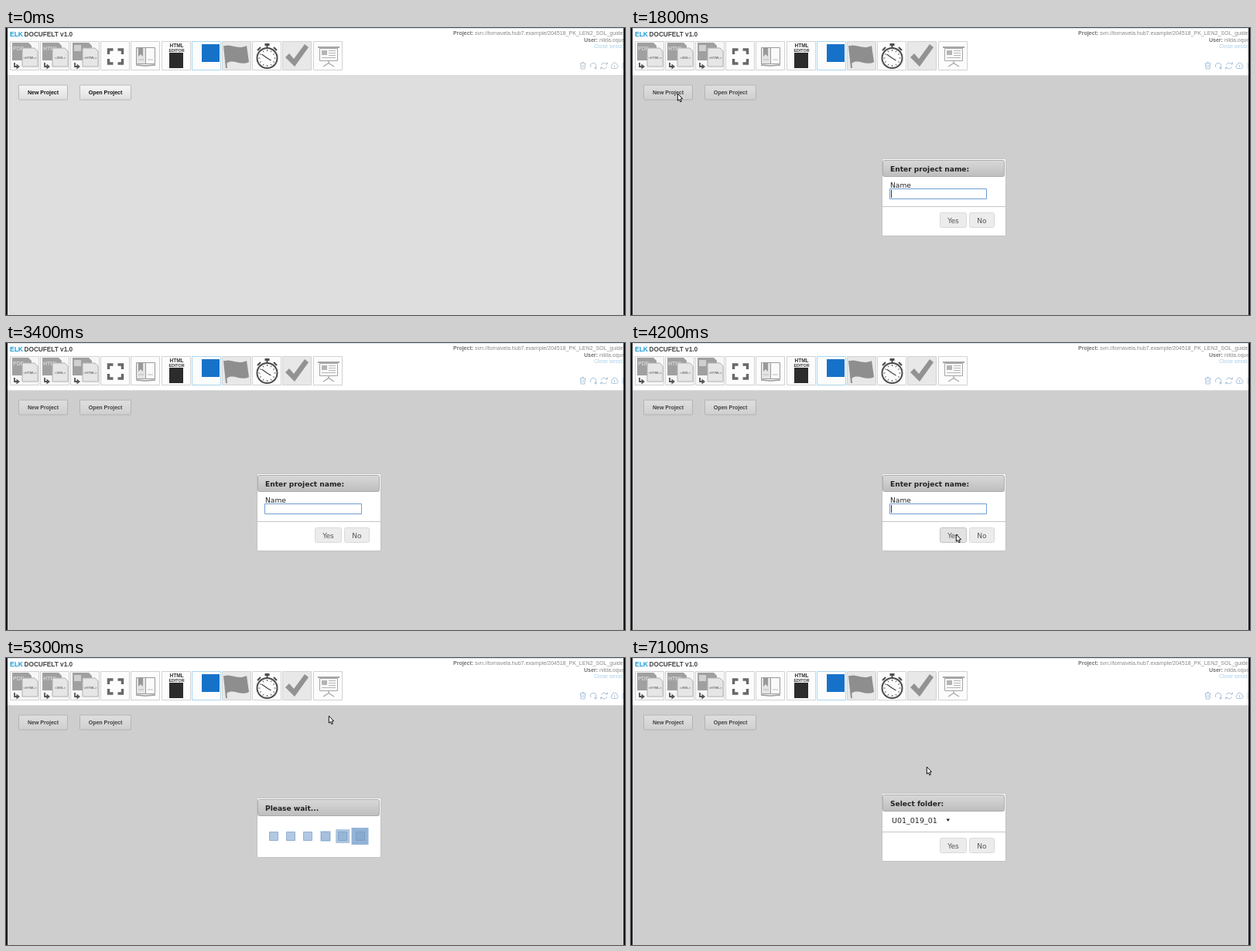
An HTML page with a canvas that plays this animation: 800x372 px, repeating every 7.2 s.

```html
<!DOCTYPE html>
<html lang="en">
<head>
<meta charset="utf-8">
<title>Project setup</title>
<style>
html, body { margin: 0; width: 100%; height: 100%; overflow: hidden; background: #dedede; }
canvas { display: block; width: 100%; height: 100%; }
</style>
</head>
<body>
<canvas id="stage" width="800" height="372"></canvas>
<script>
const g = document.getElementById('stage').getContext('2d');
const LOOP = 7200, STEP = 100;
const ARIAL = '"Liberation Sans", Arial, sans-serif';
const DEJAVU = '"DejaVu Sans", Verdana, sans-serif';

// Pointer paths: [time, x, y]
const PATHS = [
  [[200, 390, 110], [400, 330, 268], [900, 63, 91], [1000, 61, 90], [1100, 61, 79],
   [1200, 61, 79], [1400, 60, 85], [1900, 60, 85], [2400, 380, 205], [2700, 375, 205], [3200, 400, -14]],
  [[3600, 400, 24], [4200, 420, 248], [4900, 420, 248], [5100, 419, 190],
   [5200, 418, 124], [5300, 417, 75], [5500, 416, -14]],
  [[7000, 388, 53], [7100, 382, 141]]
];

function rect(x, y, w, h, fill) {
  g.fillStyle = fill;
  g.fillRect(x, y, w, h);
}

function box(x, y, w, h, fill, edge, r = 0) {
  g.beginPath();
  g.roundRect(x + 0.5, y + 0.5, w - 1, h - 1, r);
  g.fillStyle = fill;
  g.fill();
  g.lineWidth = 1;
  g.strokeStyle = edge;
  g.stroke();
}

function text(s, x, y, font, color, align = 'left') {
  g.font = font;
  g.fillStyle = color;
  g.textAlign = align;
  g.fillText(s, x, y);
}

function shape(points, fill) {
  g.beginPath();
  points.forEach(([x, y]) => g.lineTo(x, y));
  g.closePath();
  g.fillStyle = fill;
  g.fill();
}

function line(points, color, width) {
  g.beginPath();
  points.forEach(([x, y]) => g.lineTo(x, y));
  g.strokeStyle = color;
  g.lineWidth = width;
  g.stroke();
}

function arc(x, y, r, from, to, color, width) {
  g.beginPath();
  g.arc(x, y, r, from, to);
  g.strokeStyle = color;
  g.lineWidth = width;
  g.stroke();
}

function shade(y, h, top, bottom) {
  const s = g.createLinearGradient(0, y, 0, y + h);
  s.addColorStop(0, top);
  s.addColorStop(1, bottom);
  return s;
}

function at(x, draw) {
  g.save();
  g.translate(x, 17);
  draw();
  g.restore();
}

// Toolbar icons, drawn relative to their cell
function convertIcon(label, tag) {
  shape([[3, 2], [24, 2], [28, 6], [28, 25], [3, 25]], '#a0a0a0');
  if (label) text(label, 4, 12, 'bold 7px ' + ARIAL, '#d4d4d4');
  else rect(5, 5, 9, 8, '#d0d0d0');
  const page = [[16, 9], [32, 9], [36, 13], [36, 33], [16, 33]];
  shape(page, '#e6e6e6');
  line([...page, page[0]], '#b0b0b0', 1);
  text(tag, 26, 22.5, 'bold 4.3px ' + ARIAL, '#777', 'center');
  line([[6, 28], [6, 33], [9, 33]], '#555', 1.8);
  shape([[8.5, 29.5], [13, 33], [8.5, 36.5]], '#555');
}

function frameIcon() {
  for (const sx of [-1, 1]) for (const sy of [-1, 1]) {
    const p = (x, y) => [19.5 + sx * x, 20 + sy * y];
    line([p(9, 3), p(9, 9), p(3, 9)], '#686868', 3.4);
  }
}

function bookIcon() {
  box(7, 8, 13, 22, '#e4e4e4', '#999');
  box(19, 8, 13, 22, '#fafafa', '#999');
  shape([[10, 9], [16, 9], [16, 20], [13, 17], [10, 20]], '#999');
  line([[22, 24], [29, 24]], '#bbb', 1);
  line([[10, 24], [17, 24]], '#bbb', 1);
  line([[7, 31], [19, 32], [32, 31]], '#999', 1.3);
}

function editorIcon() {
  text('HTML', 19.5, 8, 'bold 6.5px ' + ARIAL, '#333', 'center');
  text('EDITOR', 19.5, 13.5, 'bold 5.3px ' + ARIAL, '#333', 'center');
  rect(10, 15, 18, 20, '#2c2c2c');
}

function flagIcon() {
  line([[3, 6], [6, 35]], '#8e8e8e', 2);
  g.beginPath();
  g.moveTo(3, 7);
  g.bezierCurveTo(11, 2, 19, 12, 32, 6);
  g.lineTo(35, 27);
  g.bezierCurveTo(24, 33, 15, 22, 6, 29);
  g.closePath();
  g.fillStyle = '#8e8e8e';
  g.fill();
}

function watchIcon() {
  const ink = '#4c4c4c';
  arc(19.5, 22, 13, 0, Math.PI * 2, ink, 2);
  rect(16.5, 3, 6, 3, ink);
  rect(18.5, 5, 2, 4, ink);
  line([[28, 8], [32, 12]], ink, 2.2);
  line([[11, 8], [7, 12]], ink, 2.2);
  for (let i = 0; i < 12; i++) {
    const a = i * Math.PI / 6, c = Math.cos(a), s = Math.sin(a);
    line([[19.5 + 9 * c, 22 + 9 * s], [19.5 + 11 * c, 22 + 11 * s]], ink, 1);
  }
  line([[12.5, 17], [19.5, 22], [24.5, 25]], ink, 1.4);
}

function checkIcon() {
  shape([[4, 21], [9, 16], [15, 23], [29, 4], [34, 8], [16, 33]], '#929292');
}

function boardIcon() {
  const ink = '#a6a6a6';
  rect(6, 7, 28, 2, ink);
  box(8, 9, 24, 17, '#fafafa', ink);
  rect(11, 12, 7, 6, '#b4b4b4');
  for (const y of [12, 15, 18]) rect(20, y, 9, 1, '#b4b4b4');
  rect(11, 21, 18, 1, '#b4b4b4');
  line([[20, 26], [20, 29]], ink, 1.3);
  line([[13, 33], [20, 28.5], [27, 33]], ink, 1.3);
}

const TOOLS = [
  () => convertIcon('PDF', '<HTML>'),
  () => convertIcon('HTML', '<XML>'),
  () => convertIcon('', '<HTML>'),
  frameIcon, bookIcon, editorIcon,
  () => rect(13, 4, 23, 23, '#1672c9'),
  flagIcon, watchIcon, checkIcon, boardIcon
];

function smallIcons(c) {
  line([[741.5, 46], [749.5, 46]], c, 1);
  line([[744, 44.5], [747, 44.5]], c, 1);
  line([[742.5, 46], [743, 53], [748, 53], [748.5, 46]], c, 1);
  line([[744.5, 48], [744.5, 51]], c, 0.8);
  line([[746.5, 48], [746.5, 51]], c, 0.8);
  arc(759, 49, 3.7, 2.6, 6.9, c, 1);
  shape([[760, 51], [764, 51], [762, 54]], c);
  arc(773, 49, 3.7, 0.3, 2.8, c, 1);
  arc(773, 49, 3.7, 3.4, 5.9, c, 1);
  shape([[775, 47], [778, 47], [777.5, 44]], c);
  shape([[768, 51], [771, 51], [768.5, 54]], c);
  arc(784.5, 50, 2.5, 1.5, 4.7, c, 1);
  arc(786.5, 48, 3, 3.4, 6.1, c, 1);
  arc(788.5, 50, 2.5, -1.4, 1.6, c, 1);
  line([[784.5, 52.5], [788.5, 52.5]], c, 1);
  line([[786.5, 48], [786.5, 51]], c, 1);
  line([[797, 45], [797, 53]], c, 1);
}

function header(t) {
  rect(0, 0, 800, 61, '#fff');
  rect(0, 0, 800, 1, '#d3e2ec');
  rect(0, 61, 800, 1, '#d8dadb');
  text('ELK', 5, 10.5, 'bold 8.5px ' + ARIAL, '#1c9cd8');
  text('DOCUFELT v1.0', 23.5, 10.5, 'bold 8.25px ' + ARIAL, '#444');
  text('Project:', 578, 9, 'bold 7px ' + ARIAL, '#707070');
  text('svn://tornavela.hub7.example/204518_PK_LEN2_SOL_guide', 606, 9, '7.05px ' + ARIAL, '#888');
  text('User:', 747, 17.5, 'bold 7px ' + ARIAL, '#707070');
  text('nilda.oque', 767, 17.5, '7px ' + ARIAL, '#888');
  text('Close session', 760, 25.5, '7px ' + ARIAL, '#a9cde8');
  smallIcons(t < 900 ? '#b9c5d0' : '#a9c3dd');
  TOOLS.forEach((draw, i) => at(Math.round(4.5 + i * 39.2), () => {
    const fill = i === 7 || i === 9 ? '#e8e8e8' : i < 3 ? '#f7f7f7' : '#fcfcfc';
    box(0, 0, 38, 38, fill, i === 6 ? '#a9d6ee' : '#d2d2d2');
    draw();
  }));
}

function pageButton(label, x, w, hover) {
  box(x, 73.5, w, 20, shade(74, 19, '#f6f6f6', '#dfdfdf'), hover ? '#a2a2a2' : '#b8b8b8', 1);
  text(label, x + w / 2, 86, 'bold 7px ' + ARIAL, '#111', 'center');
}

function dialog(title, y, h) {
  box(324, y, 161, h, '#fff', '#c2c2c2', 2);
  box(325, y + 2, 158, 22, shade(y + 2, 22, '#d9d9d9', '#bdbdbd'), '#ababab', 2);
  text(title, 335, y + 16.5, 'bold 9.1px ' + DEJAVU, '#222');
}

function dialogButtons(y, focused) {
  rect(325, y - 8, 159, 1, '#c6c6c6');
  [['Yes', 399, 35], ['No', 437, 33]].forEach(([label, x, w], i) => {
    const on = focused && i === 0;
    box(x, y, w, 20, on ? '#e2e2e2' : '#ececec', on ? '#c4c4c4' : '#dadada', 2);
    text(label, x + w / 2, y + 13.5, '9.1px ' + DEJAVU, '#555', 'center');
  });
}

function nameDialog(t) {
  dialog('Enter project name:', 169, 101);
  text('Name', 335, 206.5, '9.1px ' + DEJAVU, '#222');
  box(334, 208, 126, 14, '#fff', '#6f9fd2');
  if ((t - 1800) % 1100 < 500) rect(336, 210, 1, 10, '#333');
  dialogButtons(239, t >= 4200);
}

function waitDialog(t) {
  dialog('Please wait...', 181, 78);
  for (let i = 0; i < 6; i++) {
    const x = 345.7 + i * 22.36, y = 231;
    const started = t - 4660 - i * 120;
    const age = started % 720;
    const fade = 1 - age / 360;
    if (started >= 0 && fade > 0) {
      const size = 23.3 - age / 30;
      g.globalAlpha = 0.3 + 0.7 * fade;
      rect(x - size / 2, y - size / 2, size, size, '#8aadd3');
      g.globalAlpha = 1;
    }
    box(Math.round(x - 6), y - 6, 12, 12, '#b2c8e2', '#93b2d3');
    if (started >= 0 && fade > 0) {
      g.globalAlpha = fade;
      box(Math.round(x - 6), y - 6, 12, 12, '#84a7cd', '#7b9fc6');
      g.globalAlpha = 1;
    }
  }
}

function folderDialog(t) {
  dialog('Select folder:', 175, 89);
  text('U01_019_01', 337, 213.5, '9.5px ' + DEJAVU, '#222');
  shape([[407.5, 208.5], [412, 208.5], [409.75, 212]], '#222');
  dialogButtons(233, t >= 6000 && t < 6700);
}

function pointer(t) {
  const path = PATHS.find(p => t >= p[0][0] && t <= p[p.length - 1][0]);
  if (!path) return;
  const i = Math.max(1, path.findIndex(k => k[0] >= t));
  const [t0, x0, y0] = path[i - 1], [t1, x1, y1] = path[i];
  const k = (t - t0) / (t1 - t0), e = k * k * (3 - 2 * k);
  g.save();
  g.translate(x0 + (x1 - x0) * e, y0 + (y1 - y0) * e);
  shape([[0.3, 0], [0.3, 9.3], [2.3, 7.5], [3.8, 10.8], [5.3, 10.1], [3.9, 7], [6.6, 6.7]], '#fff');
  g.lineWidth = 1;
  g.strokeStyle = '#111';
  g.stroke();
  g.restore();
}

function draw(t) {
  rect(0, 0, 800, 372, '#dedede');
  header(t);
  pageButton('New Project', 16, 64, t >= 900 && t < 1700);
  pageButton('Open Project', 95, 67, false);
  if (t >= 1700) {
    rect(0, 62, 800, 310, 'rgba(170,170,170,0.3)');
    if (t < 4500) nameDialog(t);
    else if (t < 5600) waitDialog(t);
    else folderDialog(t);
  }
  pointer(t);
  rect(0, 0, 2, 372, '#15171c');
  rect(798, 0, 2, 372, '#15171c');
}

const begin = performance.now();
function tick() {
  const t = (performance.now() - begin) % LOOP;
  draw(Math.floor(t / STEP) * STEP);
  requestAnimationFrame(tick);
}
tick();
</script>
</body>
</html>
```
